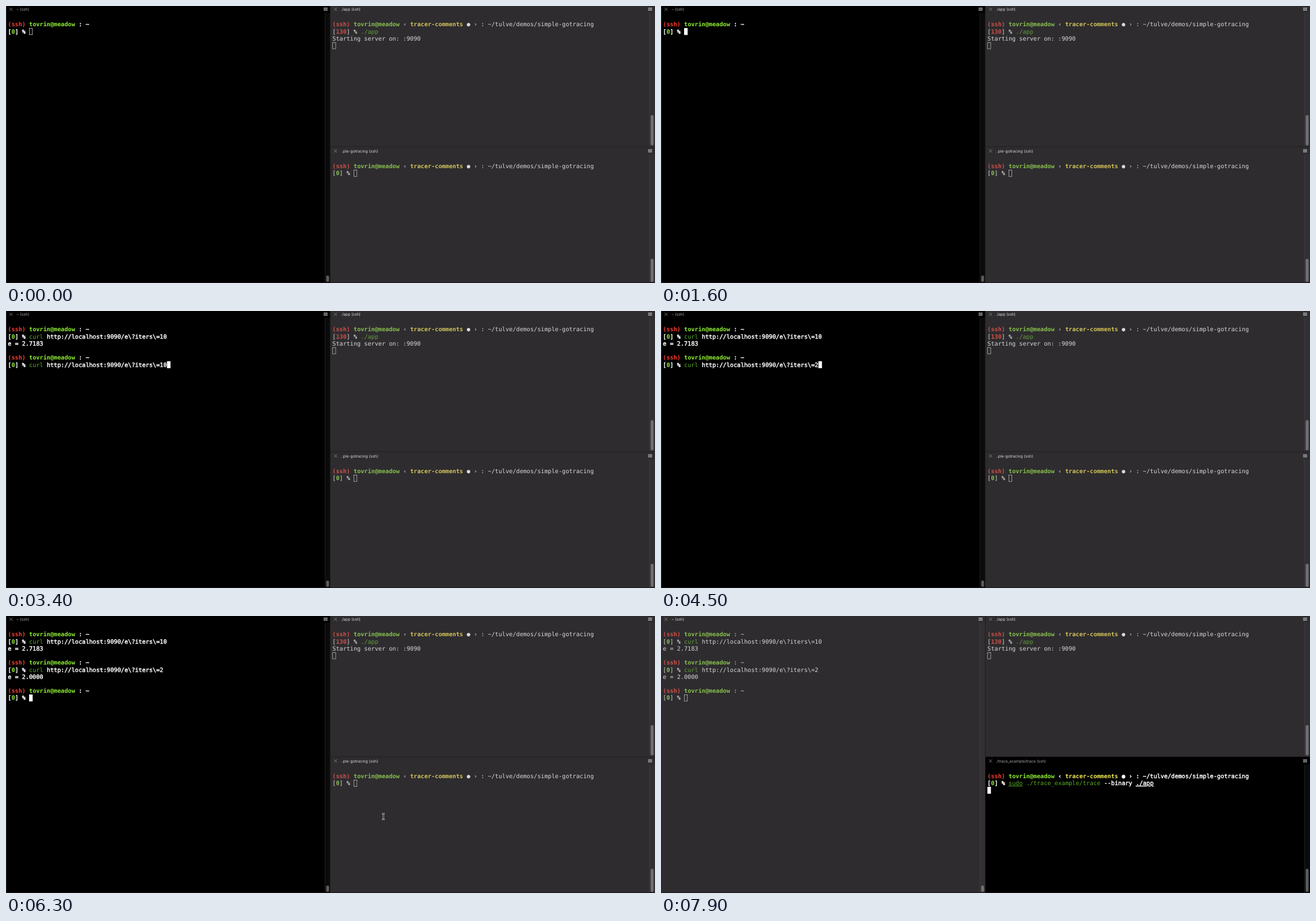
An HTML page that plays this animation: 1124 px wide and 480 px high, repeating every 8 s.

```html
<!DOCTYPE html>
<html lang="en">
<head>
<meta charset="utf-8">
<title>Terminal panes</title>
<style>
  html, body { margin: 0; width: 100%; height: 100%; overflow: hidden; background: #161517; }
  svg { display: block; width: 1124px; height: 480px; }
  text { font: 10.17px "DejaVu Sans Mono", monospace; white-space: pre; text-rendering: geometricPrecision; }
  .bold { font-weight: bold; }
  .link { text-decoration: underline; }
  .glow { stroke: #fff; stroke-width: 0.45px; }
  .title { font: 6.7px Inter, sans-serif; }
</style>
</head>
<body>
<svg id="stage" viewBox="0 0 1124 480"></svg>
<script>
const LOOP = 8000, STEP = 100;
const CELL = 6.122, LINE = 12.22;
const stage = document.getElementById("stage");

const BRIGHT = { bg: "#000", track: "#0b0b0b", edge: "#1e1e1e", thumb: "#5c5c5c", title: "#a8a8a8",
  red: "#ff3b2f", green: "#90f034", yellow: "#f6ee55", white: "#fff", cmd: "#58ad24" };
const DIM = { bg: "#2e2c2f", track: "#323033", edge: "#3d3b3e", thumb: "#717072", title: "#dcdcdc",
  red: "#cf5148", green: "#88c04f", yellow: "#d2c459", white: "#d8d8d8", cmd: "#619d3d" };

// A line is a list of [colour, text, class] runs.
const who = [["red", "(ssh)", "bold"], ["white", " "], ["green", "tovrin@meadow", "bold"]];
const homeLine = [...who, ["white", " : ~"]];
const repoLine = [...who, ["white", " ‹ "], ["yellow", "tracer-comments", "bold"],
  ["white", " ● › : ~/tulve/demos/simple-gotracing"]];
const prompt = (code, ...command) => [["white", "["], [code ? "red" : "green", String(code), "bold"],
  ["white", "] "], ["white", "%", "bold"], ["white", " "], ...command];
const curl = iters => prompt(0, ["cmd", "curl"], ["white", " http://localhost:9090/e\\?iters\\=" + iters]);
const plain = text => [["white", text]];
const trace = prompt(0, ["cmd", "sudo", "link"], ["cmd", " ./trace_example/trace"],
  ["white", " --binary "], ["white", "./app", "link"]);

function leftLines(t) {
  const lines = [homeLine];
  if (t < 1900) return [...lines, prompt(0)];
  lines.push(curl(10));
  if (t < 2700) return lines;
  if (t < 2800) return [...lines, []];
  lines.push(plain("e = 2.7183"), [], homeLine);
  if (t < 3300) return [...lines, prompt(0)];
  lines.push(curl(t < 3900 ? "10" : t < 4000 ? "1" : t < 4500 ? "" : "2"));
  if (t < 4800) return lines;
  if (t < 4900) return [...lines, []];
  return [...lines, plain("e = 2.0000"), [], homeLine, prompt(0)];
}

function traceLines(t) {
  if (t < 6900) return [repoLine, prompt(0)];
  return t < 7800 ? [repoLine, trace] : [repoLine, trace, []];
}

const rect = (x, y, w, h, fill, extra = "") =>
  `<rect x="${x}" y="${y}" width="${w}" height="${h}" fill="${fill}" ${extra}/>`;
const path = (d, stroke, width) =>
  `<path d="${d}" fill="none" stroke="${stroke}" stroke-width="${width}"/>`;
const label = (x, y, fill, cls, text) =>
  `<text x="${x}" y="${y}" fill="${fill}" class="${cls}">${text}</text>`;

function drawPane({ x, y, w, h, title, lines, thumb, lit, solid }) {
  const c = lit ? BRIGHT : DIM, right = x + w;
  let out = rect(x, y, w, h, c.bg)
    + rect(right - 10, y + 12, 10, h - 12, c.track)
    + rect(right - 10, y + 12, 1, h - 12, c.edge)
    + rect(right - 7.5, thumb[0], 5, thumb[1] - thumb[0], c.thumb, 'rx="2.5"')
    + path(`M${x + 6} ${y + 3}l5.4 5.4m0-5.4l-5.4 5.4`, "#929192", 0.8)
    + path(`M${right - 12} ${y + 3.5}h7m-7 2h7m-7 2h7`, "#c4c4c4", 1)
    + label(x + 18, y + 8, c.title, "title", title);
  const left = x + 3.3;
  let col = 0;
  lines.forEach((runs, row) => {
    col = 0;
    for (const [colour, text, cls = ""] of runs) {
      const glow = lit && colour === "white" ? " glow" : "";
      out += label(left + col * CELL, y + 35.4 + row * LINE, c[colour], cls + glow, text);
      col += text.length;
    }
  });
  const cx = left + col * CELL, cy = y + 26 + (lines.length - 1) * LINE;
  return out + (solid
    ? rect(cx, cy, 6.1, 12, "#fff")
    : rect(cx + 0.4, cy + 0.5, 5.3, 11, "none", `stroke="${c.white}" stroke-width="0.65"`));
}

function drawPointer(t) {
  const start = [1061, 329], rest = [235, 161], end = [653.5, 347.5];
  let from, to, p;
  if (t >= 200 && t < 1600) [from, to, p] = [start, rest, (t - 200) / 800];
  else if (t >= 5900 && t < 6800) [from, to, p] = [rest, end, (t - 5800) / 500];
  else return "";
  p = Math.min(p, 1);
  p = p * p * (3 - 2 * p);
  const [x, y] = from.map((v, i) => v + (to[i] - v) * p);
  const beam = `M${x - 2.5} ${y - 5}q2.5 0 2.5 2v6q0 2-2.5 2M${x + 2.5} ${y - 5}q-2.5 0-2.5 2v6q0 2 2.5 2`;
  return path(beam, "#ddd", 2) + path(beam, "#222", 0.8);
}

function render(t) {
  const switched = t >= 6700;
  stage.innerHTML =
    drawPane({ x: 0, y: 0, w: 562, h: 480, title: "~ (ssh)", lines: leftLines(t),
      thumb: [467, 478], lit: !switched, solid: t >= 1000 && !switched })
    + drawPane({ x: 562, y: 0, w: 562, h: 244, title: "./app (ssh)",
      lines: [repoLine, prompt(130, ["cmd", "./app"]), plain("Starting server on: :9090"), []],
      thumb: [189, 241.5] })
    + rect(562, 244, 562, 2, switched ? BRIGHT.bg : DIM.bg)
    + drawPane({ x: 562, y: 245.5, w: 562, h: 234.5,
      title: t < 7900 ? "..ple-gotracing (ssh)" : "./trace_example/trace (ssh)",
      lines: traceLines(t), thumb: [438, 478], lit: switched, solid: switched })
    + rect(562, 243.5, 562, 0.8, "#1f1d20")
    + rect(561, 0, 1, 480, "#1f1d20")
    + rect(0, 0, 1, 480, "#2b292c")
    + rect(0, 479, 1124, 1, "#1a1518")
    + drawPointer(t);
}

let shown = -1;
function tick() {
  const t = Math.floor(performance.now() % LOOP / STEP) * STEP;
  if (t !== shown) render(shown = t);
  requestAnimationFrame(tick);
}
tick();
</script>
</body>
</html>
```
